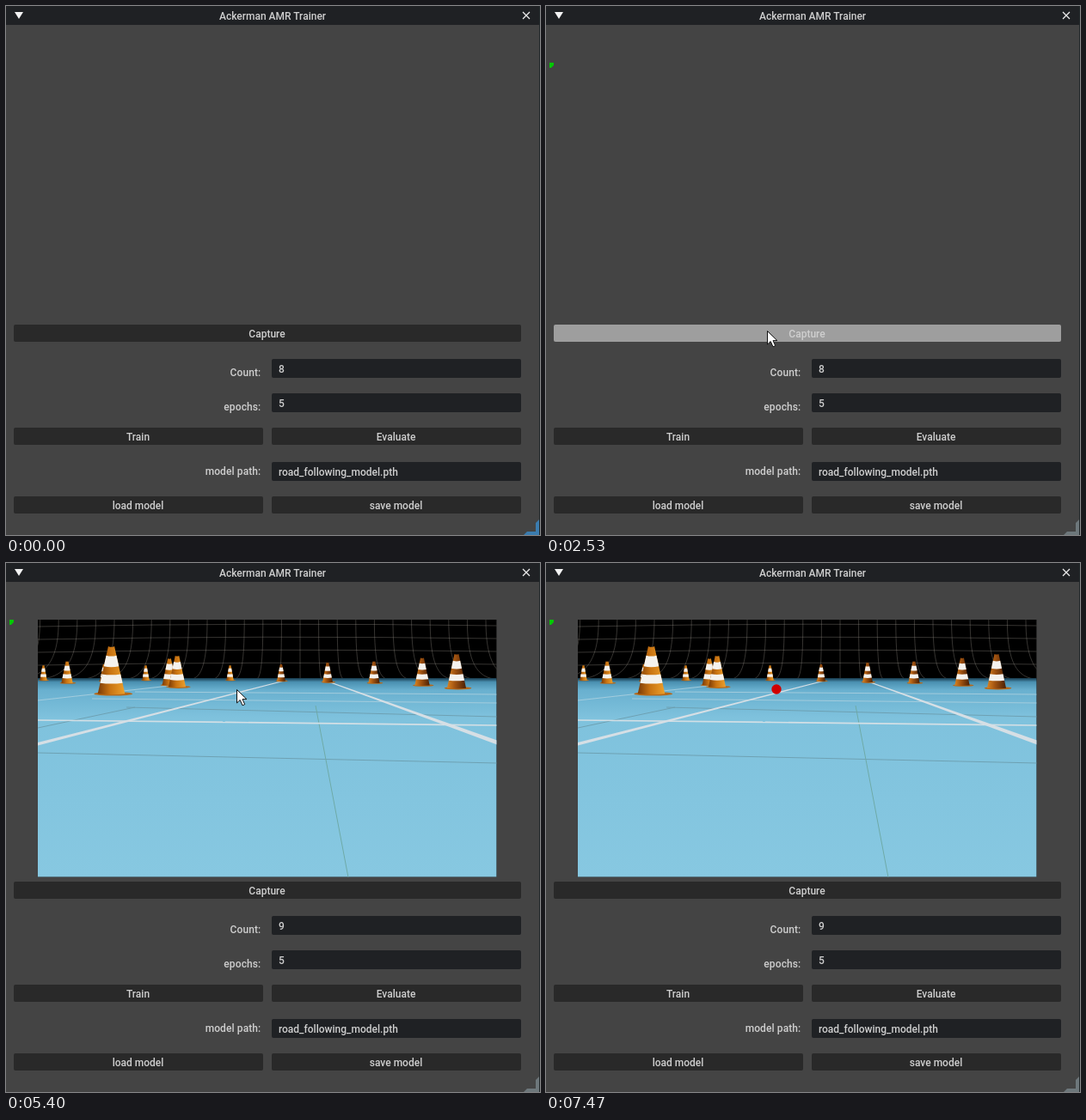
These frames come from a looping animation (621 by 616 pixels, 7.99 s). An HTML page:

```html
<!DOCTYPE html>
<html lang="en">
<head>
<meta charset="utf-8">
<title>Trainer panel</title>
<style>
  html, body { margin: 0; width: 100%; height: 100%; overflow: hidden; background: #444; }
  svg { display: block; width: 621px; height: 616px; }
  text { font: 500 12px Roboto, sans-serif; fill: #cfcfcf; }
  .mid { text-anchor: middle; }
  .end { text-anchor: end; letter-spacing: .1px; }
  .button { fill: #292929; }
  .field { fill: #1f2124; }
</style>
</head>
<body>
<svg viewBox="0 0 621 616">
  <defs>
    <linearGradient id="floor" x1="0" y1="134" x2="0" y2="366" gradientUnits="userSpaceOnUse">
      <stop offset="0" stop-color="#17394c"/>
      <stop offset=".02" stop-color="#4a90b1"/>
      <stop offset=".06" stop-color="#69b0cf"/>
      <stop offset=".2" stop-color="#7fc2dd"/>
      <stop offset="1" stop-color="#87c8e1"/>
    </linearGradient>
    <linearGradient id="litRight">
      <stop offset="0" stop-color="#7a3a06"/>
      <stop offset=".45" stop-color="#c87312"/>
      <stop offset="1" stop-color="#eda02c"/>
    </linearGradient>
    <linearGradient id="litLeft">
      <stop offset="0" stop-color="#d98320"/>
      <stop offset=".4" stop-color="#a35410"/>
      <stop offset="1" stop-color="#4a2005"/>
    </linearGradient>
    <clipPath id="view"><rect x="37" y="66" width="533.400" height="299.500"/></clipPath>
  </defs>

  <rect width="621" height="616" fill="#444"/>
  <rect width="621" height="22" fill="#1f2124"/>
  <path d="M10 7h10l-5 8z" fill="#f4f4f4"/>
  <path d="M601 7l8 8m0-8l-8 8" stroke="#f0f0f0" stroke-width="1.2"/>
  <text class="mid" x="310" y="16">Ackerman AMR Trainer</text>
  <path id="grip" d="M620 598l-4 4v10h-10l-4 4h18z"/>
  <rect x="620" width="1" height="616" fill="#23292b"/>

  <g id="widgets"></g>
  <path id="marker" d="M4 66h5v3l-3 3h-2z" fill="#00c800"/>

  <g id="camera" clip-path="url(#view)">
    <rect x="37" y="66" width="534" height="300"/>
    <path id="backdrop" fill="none" stroke="#a39d92" stroke-width=".7" opacity=".48"/>
    <rect x="37" y="134" width="534" height="232" fill="url(#floor)"/>
    <g fill="none">
      <path d="M37 221L571 233M140 168L571 179M37 192L150 168" stroke="#6d9dae" stroke-width=".9"/>
      <path d="M360 166L398 366" stroke="#6eaaa7"/>
      <path d="M37 160L190 143M100 158L571 163M150 150L571 153" stroke="#a9cfde" stroke-width=".9"/>
      <path d="M37 183L571 189" stroke="#d3dfe5" stroke-width="1.7"/>
    </g>
    <path d="M37 209L320 137.5 322 138 37 212.5zM373 138h3L571 206.500v5z" fill="#d6dfe5"/>
    <g id="cones"></g>
    <circle id="target" cx="268" cy="147" r="5.700" fill="#d00000"/>
  </g>

  <path id="cursor" d="M.5 .5V16l3.700-3.500 2.800 6.300 2.700-1.200-2.700-6h4.900z"
        fill="#fff" stroke="#111" stroke-linejoin="round"/>
</svg>
<script>
const LOOP = 7990, FRAME = 1000 / 15;
const $ = id => document.getElementById(id);
const add = (parent, markup) => parent.insertAdjacentHTML('beforeend', markup);
const widgets = $('widgets');

function button(label, x, y, width = 290) {
  add(widgets, `<rect class="button" x="${x}" y="${y}" width="${width}" height="20" rx="2"/>`);
  const box = widgets.lastElementChild;
  add(widgets, `<text class="mid" x="${x + width / 2 - .5}" y="${y + 15}">${label}</text>`);
  const contains = p => p[0] >= x && p[0] < x + width && p[1] >= y && p[1] < y + 20;
  return { box, contains };
}

function field(label, id, value, y, labelY) {
  add(widgets, `<text class="end" x="296.400" y="${labelY}">${label}</text>
    <rect class="field" x="309" y="${y}" width="290" height="22" rx="2"/>
    <text id="${id}" x="317" y="${y + 16}">${value}</text>`);
}

const buttons = [
  button('Capture', 9, 371, 590),
  button('Train', 9, 491), button('Evaluate', 309, 491),
  button('load model', 9, 571), button('save model', 309, 571)
];
field('Count:', 'count', '8', 411, 431);
field('epochs:', 'epochs', '5', 451, 471);
field('model path:', 'path', 'road_following_model.pth', 531, 546);

// Wire backdrop whose lines flare outwards where they meet the floor
let wires = '';
for (let i = -16; i <= 13; i++) {
  const x = 342 + i * 21.6, flare = i * 3.5;
  wires += `M${x} 66C${x} 105 ${x + flare * .2} 132 ${x + flare} 135`;
}
for (let y = 72; y < 130; y += 15) wires += `M37 ${y + 2}Q300 ${y - 3} 571 ${y + 1}`;
$('backdrop').setAttribute('d', wires);

// A cone grows the further its base lies below the horizon
function cone(x, base) {
  const height = 18 + (base - 137) * 2.3, half = height * .42 - 1.5;
  const top = base - height;
  const at = f => [half * (.16 + .56 * f), top + height * f];
  const slice = (from, to, fill) => {
    const [w1, y1] = at(from), [w2, y2] = at(to), sag = height * .03;
    return `<path d="M${x - w1} ${y1}Q${x} ${y1 + sag} ${x + w1} ${y1}L${x + w2} ${y2}Q${x} ${y2 + sag} ${x - w2} ${y2}z" fill="${fill}"/>`;
  };
  const paint = x < 300 ? 'url(#litRight)' : 'url(#litLeft)';
  add($('cones'), `<ellipse cx="${x + half * .1}" cy="${base - height * .03}" rx="${half}" ry="${height * .04}" fill="#b5691a"/>`
    + slice(0, .97, paint) + slice(.19, .41, '#f4f2ee') + slice(.57, .75, '#f4f2ee'));
}
for (const [x, base] of [
  [43.5, 137], [71, 140.5], [114, 138], [122.5, 154], [162.5, 137], [190, 143], [199, 145.5],
  [260.5, 137], [320, 138], [374, 139.5], [428, 140.5], [484, 143.5], [524, 147]
]) cone(x, base);

// Pointer moves: first step, last step, then the control points of a Bezier curve
const moves = [
  [3, 14, [604, 602], [330, 436], [277, 404]],
  [14, 26, [277, 404], [135, 190], [135, 265], [250, 365]],
  [26, 29, [250, 365], [257, 378]],
  [44, 57, [257, 378], [262, 200], [253, 173]],
  [57, 67, [253, 173], [246, 160], [268, 147]],
  [96, 111, [268, 147], [259, 232], [60, 668], [67, 616]]
];
const ENTER = 3, LEAVE = 112, PRESS = 34;

function bezier(points, t) {
  if (points.length === 1) return points[0];
  const a = bezier(points.slice(0, -1), t), b = bezier(points.slice(1), t);
  return a.map((v, i) => v + (b[i] - v) * t);
}

function pointerAt(step) {
  if (step < ENTER || step >= LEAVE) return null;
  const [start, end, ...points] = moves.findLast(move => move[0] <= step);
  return bezier(points, Math.min(1, (step - start) / (end - start))).map(Math.round);
}

const show = (id, on) => $(id).setAttribute('visibility', on ? 'visible' : 'hidden');

function draw(now) {
  const step = Math.floor((now % LOOP + 3.4) / FRAME);
  const pointer = pointerAt(step);
  show('cursor', pointer);
  if (pointer) $('cursor').setAttribute('transform', `translate(${pointer})`);

  for (const { box, contains } of buttons) {
    const hover = pointer && contains(pointer);
    box.style.fill = !hover ? '' : step === PRESS ? '#6b7730' : '#9e9e9e';
  }
  $('grip').setAttribute('fill', step <= ENTER ? '#3b7caf' : '#6d777b');
  show('marker', step >= 38);
  show('camera', step >= 39);
  show('target', step >= 82);
  $('count').textContent = step >= 81 ? '9' : '8';
  requestAnimationFrame(draw);
}
requestAnimationFrame(draw);
</script>
</body>
</html>
```
